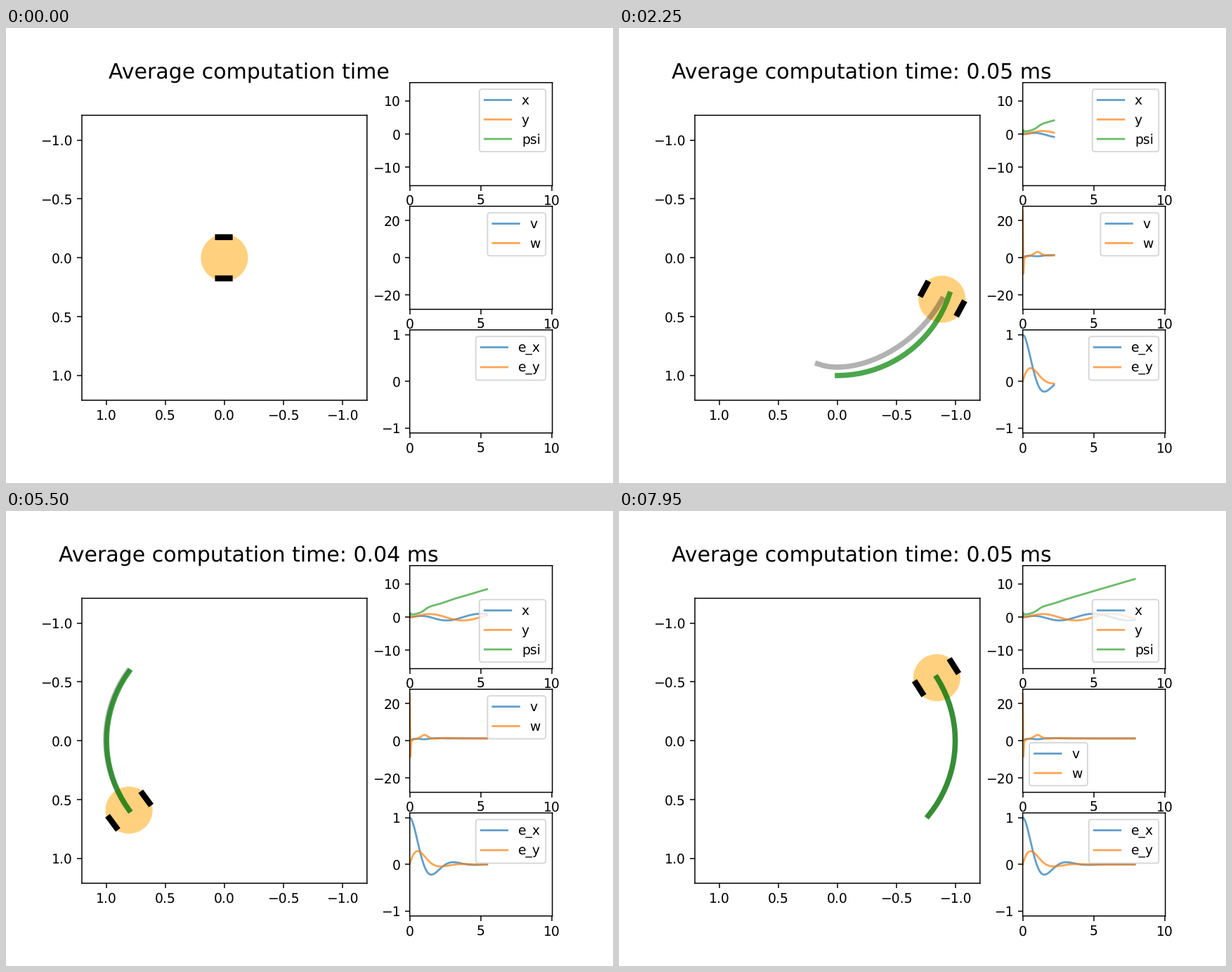
Animation, 864 px wide and 648 px high, one loop 8000 ms. Source, as a matplotlib script:

```python
import numpy as np
import matplotlib.pyplot as plt
from matplotlib.animation import FuncAnimation
from matplotlib.patches import Circle, Polygon

plt.rcParams["text.hinting"] = "none"
plt.rcParams["path.snap"] = False

DT = 0.05
STEPS = 201
FRAMES = 160
TRAIL = 20
OMEGA = 2 * np.pi / 5
KP, KD = 5.0, 2.0
HALF = 1.21

# (first frame, hundredths of a millisecond) shown in the heading
TIMINGS = [(1, 6), (8, 5), (14, 4), (20, 3), (26, 4), (42, 5), (54, 6), (57, 5),
           (64, 4), (72, 3), (78, 4), (113, 5), (117, 6), (124, 5), (130, 6),
           (135, 7), (146, 6), (151, 5)]


def simulate():
    """Unicycle following a circle with dynamic feedback linearization."""
    t = np.arange(STEPS) * DT
    ref = np.array([np.cos(OMEGA * t), np.sin(OMEGA * t)])
    ref_vel = OMEGA * np.array([-ref[1], ref[0]])
    ref_acc = -OMEGA ** 2 * ref
    pose = np.zeros((3, STEPS))
    inputs = np.zeros((2, STEPS))
    x = y = psi = 0.0
    v = 0.1
    for k in range(STEPS):
        c, s = np.cos(psi), np.sin(psi)
        pose[:, k] = x, y, psi
        err = ref[:, k] - (x, y)
        err_vel = ref_vel[:, k] - (v * c, v * s)
        acc_x, acc_y = ref_acc[:, k] + KP * err + KD * err_vel
        w = (acc_y * c - acc_x * s) / v
        v += (acc_x * c + acc_y * s) * DT
        inputs[:, k] = v, w
        # drive along a circular arc for one step
        half_turn = w * DT / 2
        chord = v * DT * np.sinc(half_turn / np.pi)
        x += chord * np.cos(psi + half_turn)
        y += chord * np.sin(psi + half_turn)
        psi += w * DT
    return t, ref, pose, inputs


def wheel(x, y, psi, side):
    """Corners of one wheel in world coordinates."""
    lon = np.array([-0.07, 0.08, 0.08, -0.07])
    lat = side * np.array([0.15, 0.15, 0.2, 0.2])
    c, s = np.cos(psi), np.sin(psi)
    return np.column_stack([x + lon * c - lat * s, y + lon * s + lat * c])


t, ref, pose, inputs = simulate()
error = ref - pose[:2]

fig = plt.figure(figsize=(6.4, 4.8), dpi=135)
grid = fig.add_gridspec(3, 2, width_ratios=[2, 1])
heading = fig.text(0.4, 0.9, "", ha="center", va="center", fontsize=16)

stage = fig.add_subplot(grid[:, 0])
stage.set_aspect("equal")
stage.set_xlim(HALF, -HALF)
stage.set_ylim(HALF, -HALF)
body = stage.add_patch(Circle((0, 0), 0.2, fc="orange", ec="none", alpha=0.5))
wheels = [stage.add_patch(Polygon(wheel(0, 0, 0, side), fc="black", ec="none"))
          for side in (1, -1)]
path, = stage.plot([], [], color="black", lw=4, alpha=0.3)
goal, = stage.plot([], [], color="green", lw=4, alpha=0.7)


def panel(row, data, labels):
    ax = fig.add_subplot(grid[row, 1])
    top = 1.1 * np.abs(data).max()
    ax.set_xlim(0, STEPS * DT)
    ax.set_ylim(-top, top)
    lines = [ax.plot([], [], alpha=0.7, label=name)[0] for name in labels]
    ax.legend(loc="best")
    return list(zip(lines, data))


curves = (panel(0, pose, ["x", "y", "psi"])
          + panel(1, inputs, ["v", "w"])
          + panel(2, error, ["e_x", "e_y"]))


def update(k):
    text = "Average computation time"
    shown = [value for start, value in TIMINGS if start <= k]
    if shown:
        text += f": {shown[-1] / 100:.2f} ms"
    heading.set_text(text)

    x, y, psi = pose[:, k]
    body.center = x, y
    for patch, side in zip(wheels, (1, -1)):
        patch.set_xy(wheel(x, y, psi, side))

    recent = slice(max(0, k - TRAIL), k + 1)
    path.set_data(pose[0, recent], pose[1, recent])
    goal.set_data(ref[0, recent], ref[1, recent])
    for line, data in curves:
        line.set_data(t[:k], data[:k])


anim = FuncAnimation(fig, update, frames=FRAMES, interval=50,
                     init_func=lambda: update(0), repeat=True, repeat_delay=0)
plt.show()
```
